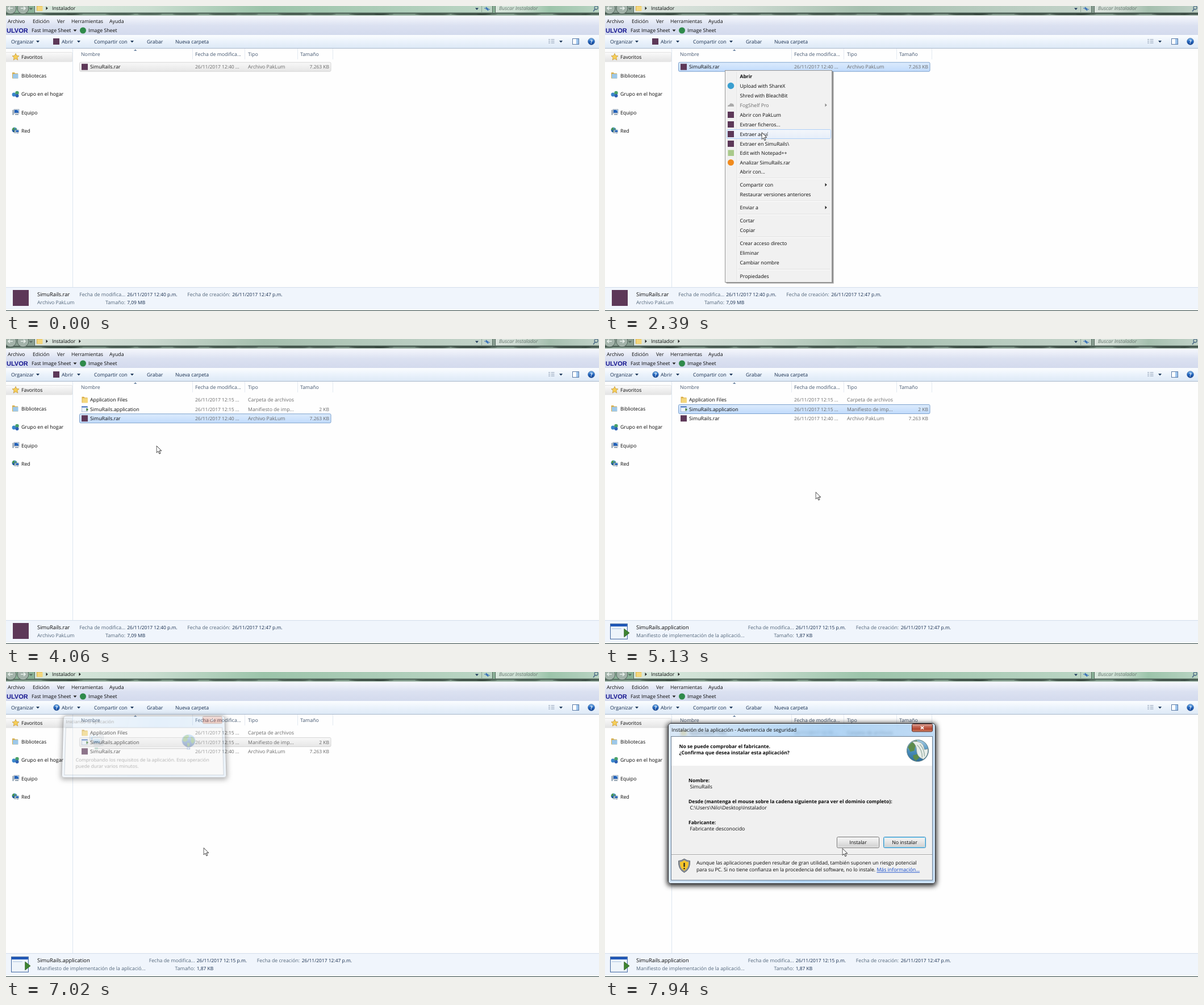
An HTML page that plays this animation: 1044x537 px, repeating every 7990 ms.

```html
<!DOCTYPE html>
<html lang="es">
<head>
<meta charset="utf-8">
<title>Instalador</title>
<style>
html, body { margin: 0; width: 100%; height: 100%; overflow: hidden; background: #fefefe; }
#stage { position: absolute; left: 0; top: 0; width: 1044px; height: 537px; overflow: hidden; }
svg { position: absolute; left: 0; top: 0; display: block; }
text { font: 8.75px "Open Sans", "Noto Sans", sans-serif; fill: #0a0a0a; white-space: pre; text-rendering: geometricPrecision; }
.b { font-weight: 700; font-size: 8.55px; }
.d { font-size: 8.45px; }
.g { fill: #696969; }
.h { fill: #43566f; }
.n { fill: #152c4d; }
.s { fill: #52667a; }
.w { font-size: 9.35px; }
.i { font-style: italic; fill: #66766e; }
.e { text-anchor: end; }
.m { text-anchor: middle; }
.a { fill: #0a43c9; text-decoration: underline; }
.brand { font: 700 11px "Liberation Sans", Arial, sans-serif; fill: #14148f; }
.dlg { position: absolute; box-sizing: border-box; border: 1px solid #1d2128; border-radius: 5px;
  background: linear-gradient(100deg, rgba(196,219,242,.62), rgba(122,182,236,.6) 55%, rgba(160,200,238,.62));
  box-shadow: 0 2px 8px 2px rgba(0,0,0,.82), inset 0 0 0 1px rgba(255,255,255,.6);
  backdrop-filter: blur(2px); }
.dlg svg { left: -1px; top: -1px; }
#ext { border-color: #444b55; box-shadow: 0 1px 7px 1px rgba(0,0,0,.75), inset 0 0 0 1px rgba(255,255,255,.6); }
</style>
</head>
<body>
<div id="stage"></div>
<script>
const stage = document.getElementById('stage');
const $ = id => document.getElementById(id);
const clamp = v => Math.max(0, Math.min(1, v));
const smooth = v => v * v * (3 - 2 * v);

// ---- drawing helpers ----
const T = (x, y, s, c = '') => `<text x="${x}" y="${y + 3.1}" class="${c}">${s}</text>`;
const R = (x, y, w, h, fill, more = '') => `<rect x="${x}" y="${y}" width="${w}" height="${h}" fill="${fill}" ${more}/>`;
const C = (x, y, r, fill, more = '') => `<circle cx="${x}" cy="${y}" r="${r}" fill="${fill}" ${more}/>`;
const P = (d, fill, more = '') => `<path d="${d}" fill="${fill}" ${more}/>`;
const line = (d, col, w = 1) => P(d, 'none', `stroke="${col}" stroke-width="${w}"`);
const caret = (x, y, col = '#1e395b') => P(`M${x - 3} ${y - 1.5}h6l-3 3.5z`, col);
const next = (x, y, col = '#222') => P(`M${x - 1.5} ${y - 3}v6l3.2-3z`, col);
const grad = (id, cols, flat) => `<linearGradient id="${id}" x2="${flat ? 1 : 0}" y2="${flat ? 0 : 1}">` +
  cols.map((c, i) => `<stop offset="${i / (cols.length - 1)}" stop-color="${c}"/>`).join('') + '</linearGradient>';
const svg = (id, x, y, w, h, body) => `<svg id="${id}" width="${w}" height="${h}" viewBox="${x} ${y} ${w} ${h}">${body}</svg>`;
const dialog = (id, x, y, w, h, body, ox = x, oy = y) =>
  `<div class="dlg" id="${id}" style="left:${x}px;top:${y}px;width:${w}px;height:${h}px">${svg('', ox, oy, w, h, body)}</div>`;
const button = (x, y, w, h, label, focus) =>
  R(x + .5, y + .5, w - 1, h - 1, 'url(#btn)', `rx="2" stroke="${focus ? '#3c8fc4' : '#707070'}"`) +
  R(x + 1.5, y + 1.5, w - 3, h - 3, 'none', `rx="1" stroke="${focus ? '#7fd3f2' : '#fafafa'}" stroke-width=".9"`) +
  T(x + w / 2, y + h / 2, label, 'm');
const closer = (x, y, w, h) => R(x + .5, y + .5, w - 1, h - 1, 'url(#red)', 'rx="2" stroke="#5f2a22"') +
  line(`M${x + w / 2 - 2.6} ${y + h / 2 - 2.4}l5.2 4.8m0-4.8l-5.2 4.8`, '#fff', 1.7);

// ---- icons ----
const pack = (x, y, s) => R(x, y, s, s, '#5d3858');
const folder = (x, y, col = '#f4d77c') => P(`M${x} ${y}h4l1 1.5h5v9h-10z`, '#d9ad48') + R(x + 1, y + 2.5, 9.5, 8, col);
const pc = (x, y, k = 1) => `<g transform="translate(${x} ${y}) scale(${k})">` + R(0, 1, 3, 9, '#a9b7c4') +
  R(3, 0, 9, 7, '#d5dde4', 'stroke="#75869a" stroke-width=".6"') + R(4, 1, 7, 5, '#2361b8') +
  P('M8 1h3v3z', '#79b4ef') + R(5, 8, 6, 2, '#9aa8b4') + '</g>';
const desktop = (x, y) => `<g transform="translate(${x} ${y})">` + R(0, 1, 15, 12, '#dfe5ea', 'rx="1" stroke="#8a98a6"') +
  R(2, 3, 11, 8, 'url(#screen)') + R(18, 1, 7, 21, '#cfd6dc', 'rx="1" stroke="#8a98a6" stroke-width=".8"') +
  R(5, 6, 16, 13, '#e9edf1', 'rx="1" stroke="#8a98a6"') + R(7, 8, 12, 9, 'url(#screen)') +
  P('M9 19h8l3 5h-14z', '#c5cdd5') + '</g>';
const earth = (x, y, r) => `<g transform="translate(${x} ${y}) scale(${r / 10})">` +
  C(0, 0, 10, 'url(#sea)') + P('M-8-4q3-6 8-5l1 3-3 2 1 3-4 3-4-2z', '#4f9a3a') +
  P('M3-7q6 2 6 8l-3 4-3-4 1-4z', '#4f9a3a') + P('M-2 3l4 1-1 5h-3z', '#4f9a3a') + '</g>';
const bigGlobe = (x, y) => `<g transform="translate(${x} ${y})">` + C(0, 0, 19, 'url(#pale)', 'stroke="#5f7f86"') +
  P('M-17-6q5-11 15-12l5 5-7 5-2 8-7 2z', '#5d8c4c') + P('M-8 8l8-2 3 6-6 6q-6-4-5-10z', '#5d8c4c') +
  P('M-10-16q20-3 22 14l6-1q1 12-8 18q-12-4-12-16q0-9-8-15z', '#e9eeea', 'stroke="#7d9190" stroke-width=".7"') +
  line('M-1-10q9 8 9 22M4-11q8 9 8 21', '#9db3a8', 1.4) + '</g>';
const app = (x, y, k) => `<g transform="translate(${x} ${y}) scale(${k})">` +
  R(.5, .5, 29, 26, '#eef4fa', 'stroke="#41679f"') + R(1, 1, 28, 4, '#1f57b8') + R(3, 8, 16, 1.5, '#c3d4e8') +
  P('M24 9l9 7-9 7z', '#3d8430', 'stroke="#2c5f22" stroke-width=".8"') + '</g>';
const help = (x, y, r) => C(x, y, r, 'url(#sea)', 'stroke="#2a5596" stroke-width=".7"') +
  `<text x="${x}" y="${y + 3}" class="m" style="fill:#fff;font-weight:700">?</text>`;
const shield = (x, y) => `<g transform="translate(${x} ${y})">` +
  P('M0-12q5 3.500 10 3.500q1 15-10 20.500q-11-5.500-10-20.500q5 0 10-3.500z', '#8d9299', 'stroke="#5d646c"') +
  P('M0-9.500q4 3 7.500 3q.5 11-7.500 15.500q-8-4.500-7.500-15.500q3.500 0 7.500-3z', '#f6c52a') +
  R(-1.1, -5, 2.2, 7, '#222') + C(0, 5, 1.3, '#222') + '</g>';

// ---- explorer window ----
const defs = '<defs>' +
  grad('bar', ['#f4f6fc', '#dbe1f1', '#d3daed']) + grad('tool', ['#fbfdff', '#eaf2fb', '#dce8f5']) +
  grad('addrOn', ['#dde5df', '#cad8cf', '#a5bfae', '#b5cabd', '#c3d3c9'], 1) +
  grad('addrOff', ['#d9e8dd', '#c9ddd0', '#9cc4aa', '#abccb7', '#bcd6c5'], 1) +
  grad('under', ['#2b3a33', '#7d9487', '#dfe8e5']) +
  grad('fav', ['#fafafa', '#e4e4e4']) + grad('idle', ['#f8f8f8', '#e6e6e6']) +
  grad('sel', ['#dcebfc', '#c1dbfc']) + grad('hot', ['#fafbfd', '#ebf3fd']) +
  grad('btn', ['#f3f3f3', '#ebebeb', '#dcdcdc', '#cfcfcf']) + grad('red', ['#e0b0a5', '#c56a58', '#b2452f', '#d48a6c']) +
  grad('sea', ['#7dbcf0', '#2367c0', '#143f8a']) + grad('pale', ['#a9cfe6', '#4b8fbd', '#2f6c9c']) +
  grad('screen', ['#d3ebfb', '#6fb4e8', '#3f86cc']) + grad('pick', ['#f3f6fb', '#e6eef9']) +
  '</defs>';

const blots = Array.from({ length: 18 }, (_, i) => {
  const r = Math.abs(Math.sin(i * 12.9898) * 43758.5) % 1;
  return `<ellipse cx="${i * 60 + r * 40}" cy="14.5" rx="${14 + r * 22}" ry="1.6" fill="#1d2a24" opacity="${.25 + r * .35}"/>`;
}).join('');

const nav = [['Favoritos', 90], ['Bibliotecas', 122.5], ['Grupo en el hogar', 155], ['Equipo', 187.5], ['Red', 219.5]];
const bg = defs + R(0, 0, 1044, 537, '#fefefe') +
  '<g id="top"></g>' +
  C(8, 4, 10, '#a3b3aa', 'stroke="#53655c"') + C(30, 4, 10, '#a3b3aa', 'stroke="#53655c"') +
  line('M12 4h-8m3-3l-3 3 3 3M26 4h8m-3-3l3 3-3 3', '#e8efeb', 1.6) + caret(44, 5, '#56665d') +
  folder(54, -2) + next(72, 4) + T(81, 3.8, 'Instalador') + '<g id="crumb"></g>' +
  caret(829, 5) + line('M837.500 0v12', '#8fa598') + line('M842 4h5m-2-2l2 2-2 2M852 6h-5m2-2l-2 2 2 2', '#2e68b8', 1.2) +
  T(868, 3.8, 'Buscar Instalador', 'i') + C(1039, 3, 3, 'none', 'stroke="#4c6a86" stroke-width="1.3"') + line('M1037 5.500l-3 4', '#4c6a86', 1.5) +
  R(0, 18, 1044, 33, 'url(#bar)') +
  [['Archivo', 3], ['Edición', 47], ['Ver', 90], ['Herramientas', 115], ['Ayuda', 182]].map(a => T(a[1], 27, a[0])).join('') +
  `<text x="1" y="47" class="brand">ULVOR</text>` + T(45, 43, 'Fast Image Sheet') + caret(121.5, 43, '#222') +
  C(135.5, 43, 5.5, '#2f8a4a') + T(145, 43, 'Image Sheet') +
  R(0, 51, 1044, 24, 'url(#tool)') + line('M0 74.500h1044', '#a9b8cb') +
  T(9, 62.5, 'Organizar', 'n') + caret(56, 62.5) + '<g id="open"></g>' + T(98, 62.5, 'Abrir', 'n') + caret(128, 62.5) +
  T(155, 62.5, 'Compartir con', 'n') + caret(222, 62.5) + T(248, 62.5, 'Grabar', 'n') + T(298, 62.5, 'Nueva carpeta', 'n') +
  line('M955 59h3m1.500 0h6M955 62h3m1.500 0h6M955 65h3m1.500 0h6', '#8b9bb1', 1.2) + caret(977, 62.5) +
  R(997.5, 57.5, 11, 10, '#fff', 'stroke="#5b7aa5"') + R(1004, 58, 4, 9, '#9cc3ec') + help(1030.5, 62.5, 5.8) +
  R(-2, 81.5, 119, 16.5, 'url(#fav)', 'rx="2" stroke="#dcdcdc" stroke-width=".8"') + line('M117.500 75v421', '#dde6f0') +
  nav.map(a => T(27, a[1], a[0])).join('') +
  P('M17 83.500l1.800 4 4.200.4-3.200 2.900 1 4.300-3.800-2.300-3.800 2.300 1-4.300-3.200-2.900 4.200-.4z', '#f7cf57', 'stroke="#c1902c" stroke-width=".7"') +
  folder(11, 117, '#9cc8ea') + C(14, 156, 3.4, '#3b86cc') + C(19.5, 153, 3.2, '#4aa06a') + C(19.5, 158, 3, '#2f62b3') +
  pc(11, 182) + earth(15, 218, 4.5) + pc(15, 218, .65) +
  T(132, 85, 'Nombre', 'h') + T(333, 85, 'Fecha de modifica...', 'h') + T(426, 85, 'Tipo', 'h') + T(518, 85, 'Tamaño', 'h') +
  line('M328.500 75v19M420.500 75v19M513.500 75v19M575.500 75v19', '#e3e9f1') + P('M225 79l2.700-3 2.700 3z', '#6f87a4') +
  '<g id="rows"></g>' +
  R(0, 496, 1044, 41, '#f0f5fc') + line('M0 495.500h1044', '#d3deec') + line('M0 536.500h1044', '#33443c') + '<g id="info"></g>';

// ---- context menu ----
const items = [[123.5, 'Abrir'], [140.5, 'Upload with ShareX'], [157.5, 'Shred with BleachBit'], [174.5, 'FogShelf Pro'],
  [191.5, 'Abrir con PakLum'], [208.5, 'Extraer ficheros...'], [225.5, 'Extraer aquí'], [242.5, 'Extraer en SimuRails\\'],
  [259.2, 'Edit with Notepad++'], [275.7, 'Analizar SimuRails.rar'], [292, 'Abrir con...'], [314.8, 'Compartir con'],
  [331.8, 'Restaurar versiones anteriores'], [354.8, 'Enviar a'], [378, 'Cortar'], [395, 'Copiar'],
  [418.3, 'Crear acceso directo'], [435.3, 'Eliminar'], [452.3, 'Cambiar nombre'], [475.5, 'Propiedades']];
const menu = R(214, 116, 189, 373, '#000', 'opacity=".18"') + R(213, 115, 189, 373, '#000', 'opacity=".3"') +
  R(211.5, 113.5, 188, 373, '#f1f1f1', 'stroke="#979797"') + line('M232.500 116v368', '#e0e0e0') + line('M233.500 116v368', '#fff') +
  [303, 343, 366.5, 406.5, 463.5].map(y => line(`M234 ${y}h162`, '#dfdfdf') + line(`M234 ${y + 1}h162`, '#fff')).join('') +
  R(214.5, 0, 183, 16, 'url(#pick)', 'id="pickBox" rx="2" stroke="#aecff7"') +
  items.map((a, i) => T(237.5, a[0], a[1], i ? i == 3 ? 'g' : '' : 'b')).join('') +
  C(221.5, 140.5, 5.8, '#3a9fd0') + P('M216 177q0-3 3-3 1-4 5-2 3 0 3 5z', '#aaa') +
  [191.5, 208.5, 225.5, 242.5].map(y => pack(216, y - 5.5, 11)).join('') +
  R(216.5, 253.5, 10.5, 10.5, '#a9c98a') + C(221.5, 275.5, 5.5, '#f08a1d') +
  next(389, 174.5, '#888') + next(389, 314.8) + next(389, 354.8);

// ---- dialogs ----
const gauge = (y, w, id) => R(18.5, y, 208, 8.5, '#e6e6e6', 'rx="1.500" stroke="#b0b0b0" stroke-width=".9"') +
  R(19, y + .5, w, 7.5, '#2f9a58', id);
const ext = pack(10, 6, 11.5) + T(25, 12.5, 'Extrayendo de SimuRails.rar') +
  R(161.5, 2.5, 20, 14, '#d7e3ef', 'rx="2" stroke="#7f8c9b"') + R(181.5, 2.5, 19, 14, '#dfe7ef', 'stroke="#a3aebb"') +
  R(168, 11, 7, 2, '#fff', 'stroke="#667" stroke-width=".6"') + R(187.5, 7, 7, 5, 'none', 'stroke="#b5bcc5"') + closer(201, 2, 36, 15) +
  R(8, 24, 229, 190, '#f0f0f0', 'stroke="#8c98a6" stroke-width=".8"') +
  T(19, 40, 'C:\\Users\\Nilo\\Desktop\\Instalador\\SimuRails.rar') + T(19, 50.5, 'extrayendo') + T(19, 61, 'Application Files') +
  '<g id="pct"></g>' + gauge(69.5, 17, 'id="fill"') + T(18, 100, 'Tiempo transcurrido') + T(226, 100, '00:00:00', 'e') +
  line('M14 119.500h215', '#a8a8a8') + T(18, 139.5, 'Procesado') + gauge(148, 0) +
  button(12, 170, 110, 17.5, 'Segundo plano', 1) + button(125, 170, 108, 17.5, 'Pausa') +
  button(12, 191, 110, 17.5, 'Cancelar') + button(125, 191, 53, 17.5, 'Modo...') + button(181, 191, 52, 17.5, 'Ayuda');

const start = T(97.5, 82.5, 'Iniciando la aplicación') + closer(352, 72, 37, 15) +
  R(97.5, 94.5, 291, 91, '#f0f0f0', 'stroke="#6d7f93"') + desktop(142.5, 107.5) +
  earth(325.5, 120, 12.3) + R(150, 134, 180, 3, '#d3d3d3') + line('M150 136.500h180', '#fff', .8) +
  R(155, 134.2, 0, 1.8, '#8b8b8b', 'id="run"') + R(152, 133, 6, 4, '#4d8f7a') + R(322, 133, 6, 4, '#3d6fb5') + C(325, 135, 1, '#fff') +
  T(117.5, 157, 'Comprobando los requisitos de la aplicación. Esta operación') + T(117.5, 168.5, 'puede durar varios minutos.');

const warn = T(117, 101.8, 'Instalación de la aplicación - Advertencia de seguridad') + closer(540, 91, 37, 14.5) +
  R(116.5, 113.5, 460, 253, '#f0f0f0', 'stroke="#6d7f93"') + R(117, 114, 459, 51, '#fff') +
  T(130.5, 130.5, 'No se puede comprobar el fabricante.', 'b') + T(130.5, 142.3, '¿Confirma que desea instalar esta aplicación?', 'b') +
  bigGlobe(550.5, 138.5) +
  T(147, 190.5, 'Nombre:', 'b') + T(149.5, 202.3, 'SimuRails') +
  T(147, 227.5, 'Desde (mantenga el mouse sobre la cadena siguiente para ver el dominio completo):', 'b') +
  T(149.5, 239.3, 'C:\\Users\\Nilo\\Desktop\\Instalador') + T(147, 264.7, 'Fabricante:', 'b') + T(149.5, 276.3, 'Fabricante desconocido') +
  button(408, 290, 75, 20, 'Instalar') + button(490, 290, 75, 20, 'No instalar', 1) +
  line('M117 321.500h459', '#a5a5a5') + line('M117 322.500h459', '#fff') + shield(139.5, 341) +
  T(161, 336, 'Aunque las aplicaciones pueden resultar de gran utilidad, también suponen un riesgo potencial') +
  T(161, 348.3, 'para su PC. Si no tiene confianza en la procedencia del software, no lo instale. <tspan class="a">Más información...</tspan>');

stage.innerHTML = svg('win', 0, 0, 1044, 537, bg) +
  dialog('ext', 398, 147.5, 245, 220, ext, 0, 0) + dialog('start', 92, 71, 302, 120, start) + dialog('warn', 111, 90, 471, 283, warn) +
  svg('menu', 0, 0, 1044, 537, menu) +
  svg('cur', 0, 0, 14, 20, P('M.6.6v12.200l2.900-2.700 2 4.600 2-.9-2-4.400h3.900z', '#fff', 'stroke="#222" stroke-width=".9"'));

// ---- timeline ----
const loop = 7990;
const track = [[120, 897, 489], [830, 211, 112], [1500, 211, 112], [2120, 258, 176], [2170, 258, 176], [2390, 276, 222],
  [2590, 276, 222], [2800, 289, 225], [3750, 289, 225], [4520, 222, 120], [4700, 222, 120], [5130, 371, 269],
  [5390, 348, 309], [7700, 348, 309], [7940, 418, 310]];
const rar = ['SimuRails.rar', '26/11/2017 12:40 ...', 'Archivo PakLum', '7.263 KB', y => pack(133, y - 5.5, 11)];
const files = [['Application Files', '26/11/2017 12:15 ...', 'Carpeta de archivos', '', y => folder(133.5, y - 5.5)],
  ['SimuRails.application', '26/11/2017 12:15 ...', 'Manifiesto de imp...', '2 KB', y => app(133, y - 5, .36)], rar];
const edge = { idle: '#d6d6d6', sel: '#7da2ce', hot: '#b8d6fb' };

const cache = {};
function put(id, html) {
  if (cache[id] !== html) $(id).innerHTML = cache[id] = html;
}

function pointer(t) {
  const i = track.findIndex(k => k[0] > t);
  if (i < 0) return track[track.length - 1].slice(1);
  if (!i) return track[0].slice(1);
  const [a, b] = [track[i - 1], track[i]], p = smooth((t - a[0]) / (b[0] - a[0]));
  return [a[1] + (b[1] - a[1]) * p, a[2] + (b[2] - a[2]) * p];
}

// fade, shrink and tilt of a window that opens at a and closes at b; the glass blurs only at rest
function pose(id, t, a, b) {
  const rest = (1 - clamp((t - a) / 240)) ** 2, out = clamp((t - b) / 180), s = $(id).style;
  const shown = t > a && out < 1, moving = rest || out;
  s.visibility = shown ? 'visible' : 'hidden';
  if (!shown) return;
  s.opacity = Math.min(1, (1 - rest) * 1.27) * (1 - out);
  s.backdropFilter = moving ? 'none' : '';
  s.transform = moving ? `translateY(${-6 * rest}px) perspective(1500px) scale(${1 - .1 * rest - .07 * out}) ` +
    `rotateX(${25 * out - 12.5 * rest}deg)` : 'none';
}

function listing(list, chosen, look, x, y) {
  return list.map((f, i) => {
    const c = 107.2 + i * 16.3;
    const hot = x > 129 && x < 572 && Math.abs(y - c) < 8.15;
    const kind = i == chosen ? (hot ? 'sel' : look) : hot ? 'hot' : '';
    return (kind ? R(129.5, c - 8, 442.5, 16, `url(#${kind})`, `rx="2" stroke="${edge[kind]}"`) : '') +
      f[4](c) + T(148, c, f[0]) + T(333, c, f[1], 'g d') + T(426, c, f[2], 'g') + T(569, c, f[3], 'g d e');
  }).join('');
}

function details(isApp) {
  const dx = isApp ? 122.5 : 0;
  return (isApp ? app(9, 501, 1.03) + T(55, 507.5, 'SimuRails.application', 'w') + T(55, 521.5, 'Manifiesto de implementación de la aplicació...', 's')
    : R(12, 500, 28, 28, '#5d3858') + T(55, 507.5, 'SimuRails.rar', 'w') + T(55, 521.5, 'Archivo PakLum', 's')) +
    T(210 + dx, 507.5, 'Fecha de modifica...', 's e') + T(213.3 + dx, 507.5, `26/11/2017 12:${isApp ? 15 : 40} p.m.`, 'n d') +
    T(210 + dx, 521.5, 'Tamaño:', 's e') + T(213.3 + dx, 521.5, isApp ? '1,87 KB' : '7,09 MB', 'n d') +
    T(319.3 + dx, 507.5, 'Fecha de creación:', 's') + T(398.3 + dx, 507.5, '26/11/2017 12:47 p.m.', 'n d');
}

function draw(t) {
  const [x, y] = pointer(t);
  const within = (a, b) => t >= a && t < b;
  const active = within(1010, 2700) || within(2980, 5620) || within(7120, 7200);
  const unpacked = t >= 3240, isApp = t >= 4620, inMenu = within(1330, 2590);

  const addr = active ? 'url(#addrOn)' : 'url(#addrOff)';
  put('top', R(0, 0, 1044, 18, active ? '#8a9f93' : '#8bb298') + R(0, 12, 1044, 6, 'url(#under)', `opacity="${active ? .95 : .75}"`) + blots +
    R(50.5, -5, 806, 17, addr, 'stroke="#55695e"') + R(861.5, -5, 190, 17, addr, 'stroke="#55695e"') + line('M0 17.500h1044', '#eef3f3'));
  put('crumb', t >= 3750 ? next(130, 4) : '');
  put('open', isApp ? help(89, 62.5, 5.2) : pack(83, 57, 11));
  put('rows', listing(unpacked ? files : [rar], unpacked ? (isApp ? 1 : 2) : 0, active ? 'sel' : 'idle',
    t < 120 || inMenu || t >= 5620 ? -1 : x, y));
  put('info', details(isApp));

  $('menu').style.opacity = inMenu ? clamp((t - 1330) / 200 + .1) : 0;
  const pick = x > 213 ? items.find(a => Math.abs(a[0] - y) < 8.5) : null;
  $('pickBox').setAttribute('y', pick ? pick[0] - 8 : 0);
  $('pickBox').setAttribute('opacity', pick ? 1 : 0);

  const done = clamp((t - 2700) / 250);
  put('pct', T(226, 61, Math.round(47 * done) + '%', 'e') + T(226, 139.5, Math.round(94 * done) + '%', 'e'));
  $('fill').setAttribute('width', 17 * done);
  $('run').setAttribute('width', 170 * clamp((t - 5700) / 1340));
  pose('ext', t, 2700, 2950);
  pose('start', t, 5620, 6900);
  pose('warn', t, 7195, 1e5);

  $('cur').style.visibility = t < 120 ? 'hidden' : 'visible';
  $('cur').style.transform = `translate(${x - .6}px, ${y}px)`;
}

const began = performance.now();
function tick() {
  draw((performance.now() - began) % loop);
  requestAnimationFrame(tick);
}
draw(0);
requestAnimationFrame(tick);
</script>
</body>
</html>
```
